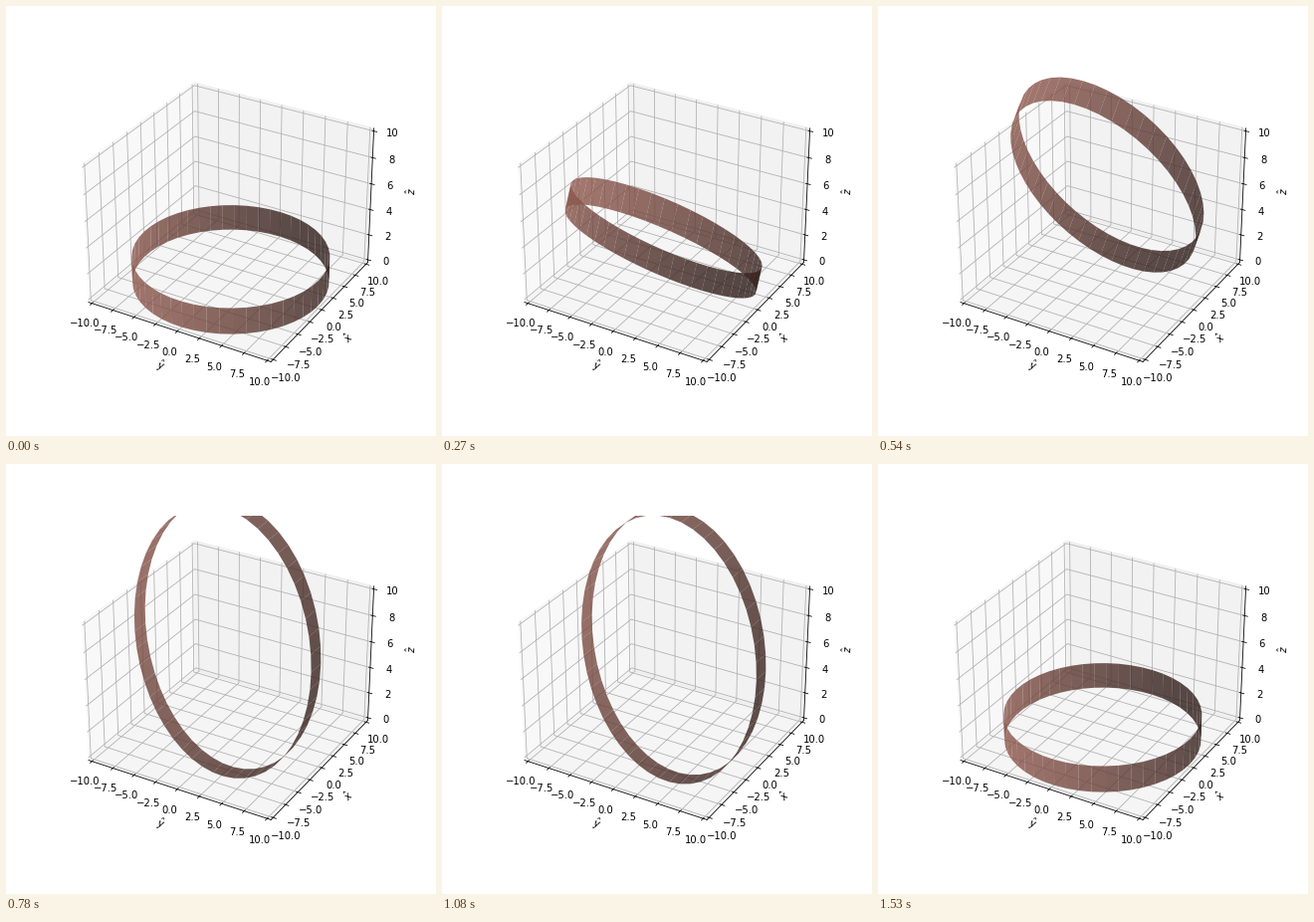
Animation of 432 by 432 pixels, one loop 1.86 s. Source, as a matplotlib script:

```python
import numpy as np
import matplotlib.pyplot as plt
from matplotlib.animation import FuncAnimation

RADIUS, HEIGHT = 10, 2
GRAVITY, SPIN = 9.8, 2 * np.pi
FLIGHT, DT = 2.5, 0.05
FRAMES, INTERVAL = 62, 30

fig = plt.figure(figsize=(6, 6), dpi=72)
fig.subplots_adjust(left=0.125, right=0.9, bottom=0.125, top=0.88)
ax = fig.add_subplot(projection="3d")
margin = 1 / 48
ax.set_xlim(-10, 10, view_margin=margin)
ax.set_ylim(-10, 10, view_margin=margin)
ax.set_zlim(0, 10, view_margin=margin)
ax.set_xticks(np.arange(-10, 10.1, 2.5))
ax.set_yticks(np.arange(-10, 10.1, 2.5))
ax.set_zticks(np.arange(0, 10.1, 2))
ax.set_xlabel(r"$\hat{y}$")
ax.set_ylabel(r"$\hat{x}$")
ax.set_zlabel(r"$\hat{z}$")

angle, level = np.meshgrid(np.linspace(0, 2 * np.pi, 50),
                           np.linspace(0, HEIGHT, 2))
ring_x = RADIUS * np.cos(angle)
ring_y = RADIUS * np.sin(angle)
surface = None


def pose(t):
    """Ring tossed upwards while it turns about the x axis."""
    if t <= 0 or t >= FLIGHT - DT / 2:
        return ring_x, ring_y, level
    lift = GRAVITY * t * (FLIGHT - t) / 2
    c, s = np.cos(SPIN * t), np.sin(SPIN * t)
    return ring_x, ring_y * c - level * s, ring_y * s + level * c + lift


def update(frame):
    global surface
    if surface is not None:
        surface.remove()
    surface = ax.plot_surface(*pose((frame - 1) * DT),
                              color="tab:brown", alpha=0.8)
    return [surface]


anim = FuncAnimation(fig, update, frames=FRAMES, interval=INTERVAL,
                     init_func=lambda: [], repeat=True)
plt.show()
```
